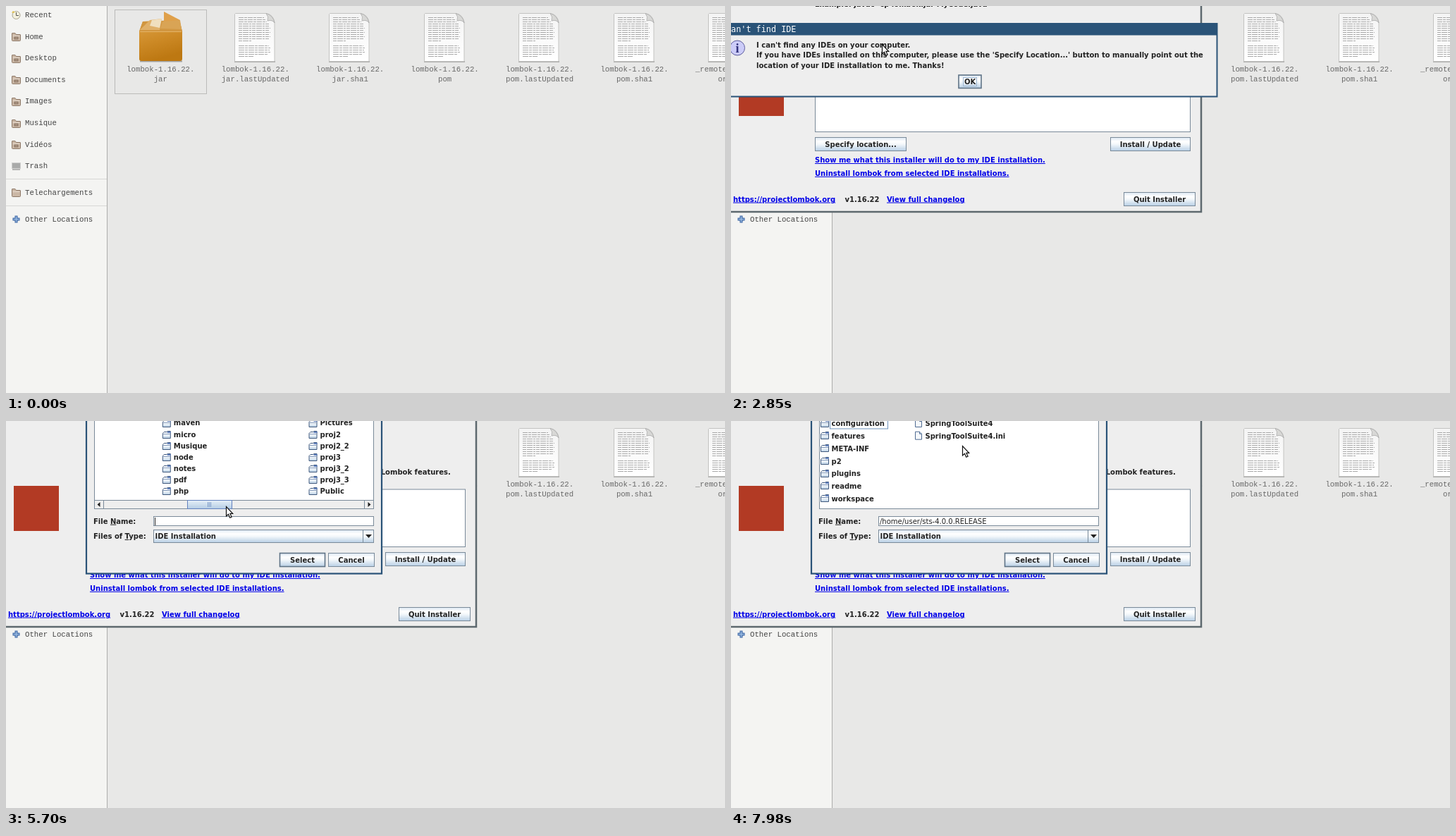
An HTML page that plays this animation: 1020 by 549 pixels, repeating every 8000 ms.

```html
<!DOCTYPE html>
<html lang="en">
<head>
<meta charset="utf-8">
<title>Installer walkthrough</title>
<style>
  html, body { margin: 0; width: 100%; height: 100%; overflow: hidden; background: #e8e8e7; }
  svg { display: block; width: 1020px; height: 549px; }
  text { font: bold 10px "DejaVu Sans", sans-serif; fill: #222; }
  .side, .file { font: 10.7px "Liberation Mono", monospace; fill: #444; }
  .file { fill: #686868; text-anchor: middle; }
  .mid { text-anchor: middle; }
  .link { fill: #0000e8; text-decoration: underline; }
  .title { font: 11.8px "DejaVu Sans Mono", monospace; fill: #fff; }
  .head { font-size: 14px; font-style: oblique; }
  .plain { font-weight: normal; }
  .key { text-decoration: underline; }
  .box { fill: #fff; stroke: #7a8a99; }
  .btn { fill: url(#ocean); stroke: #7a8a99; }
  .default { stroke: #5f7386; stroke-width: 1.6; }
  .focus { fill: none; stroke: #9bb6d2; }
  .active { stroke: #2a5378; }
  .inactive { stroke: #5d686e; }
</style>
</head>
<body>
<svg viewBox="0 0 1020 549">
  <defs>
    <linearGradient id="ocean" x2="0" y2="1">
      <stop stop-color="#dde8f3"/><stop offset=".3" stop-color="#fff"/>
      <stop offset=".5" stop-color="#f4f8fb"/><stop offset="1" stop-color="#b8cfe5"/>
    </linearGradient>
    <linearGradient id="thumbFill" x2="0" y2="1">
      <stop stop-color="#e6eff8"/><stop offset=".4" stop-color="#d3e2f0"/><stop offset="1" stop-color="#b4cce4"/>
    </linearGradient>
    <linearGradient id="carton" x2=".3" y2="1">
      <stop stop-color="#dda145"/><stop offset=".55" stop-color="#cd8a26"/><stop offset="1" stop-color="#bd7812"/>
    </linearGradient>
    <linearGradient id="paper" x2="0" y2="1">
      <stop stop-color="#f4f4f4"/><stop offset="1" stop-color="#fff"/>
    </linearGradient>
    <clipPath id="listClip"><rect x="126" width="395" height="112"/></clipPath>

    <symbol id="doc" overflow="visible">
      <path d="M0 69h58" stroke="#000" stroke-opacity=".25" stroke-width="2"/>
      <path d="M1.5.5H45Q55 2 57 13V68.500H.5V1.500Z" fill="url(#paper)" stroke="#c3c3c1"/>
      <path d="M45 .5Q49 5 47 11Q54 9 57 14Q55 3 45 .5Z" fill="#d8d8d6" stroke="#aaa" stroke-width=".8"/>
      <g stroke="#a9a9a9" stroke-width="1.100">
        <path d="M6 6.500h36M6 9.500h38M6 12.500h40" stroke-dasharray="7 1 4 1"/>
        <path d="M6 15.500h44M6 18.500h43M6 21.500h45M6 24.500h44M6 27.500h45M6 30.500h44M6 33.500h45M6 36.500h43M6 39.500h18" stroke-dasharray="5 1 8 1 3 1"/>
        <path d="M6 46.500h43M6 49.500h45M6 52.500h44M6 55.500h45M6 58.500h42M6 61.500h21" stroke-dasharray="8 1 4 1"/>
      </g>
    </symbol>
    <symbol id="place" overflow="visible">
      <path d="M.5 10.500V1Q.5.5 1 .5H5L6.500 2.500H12Q12.500 2.500 12.500 3V10.500Q12.500 11.500 11.500 11.500H1.500Q.5 11.500 .5 10.500Z" fill="#cbb8a6" stroke="#8d7867"/>
      <path d="M1.500 4.500H11.500" stroke="#e6d9cd"/>
    </symbol>
    <symbol id="folder" overflow="visible">
      <path d="M.5 10.500V3.500L2.500 1.500H6L7.500.5H11.500V10.500Z" fill="url(#ocean)" stroke="#3f587c"/>
      <path d="M7 2H12" stroke="#6382bf" stroke-width="2"/>
      <path d="M1 4.500H11" stroke="#7d95b8"/>
    </symbol>
    <symbol id="leaf" overflow="visible">
      <path d="M.5.5H6.500L9.500 3.500V11.500H.5Z" fill="#f6f9fc" stroke="#4f6b92"/>
      <path d="M6.500.5V3.500H9.500" fill="#b8cfe5" stroke="#4f6b92"/>
    </symbol>
  </defs>

  <g id="desktop"></g>
  <g id="installer"></g>
  <g id="notice"></g>
  <g id="chooser"></g>
  <path id="cursor" d="M0 0V13.500L3 10.800L5.200 15.800L7.600 14.700L5.400 9.900H9.200Z" fill="#fff" stroke="#111" stroke-width="1.200"/>
</svg>

<script>
const $ = id => document.getElementById(id);
const text = (x, y, str, cls = "") => `<text x="${x}" y="${y}" class="${cls}">${str}</text>`;
const rect = (x, y, w, h, cls, extra = "") =>
  `<rect x="${x}" y="${y}" width="${w}" height="${h}" class="${cls}" ${extra}/>`;
const use = (id, x, y) => `<use href="#${id}" x="${x}" y="${y}"/>`;
const button = (x, y, w, h, label, cls = "") =>
  rect(x, y, w, h, "btn " + cls) + text(x + w / 2, y + h / 2 + 3.7, label, "mid");

function desktop() {
  let out = rect(0, 0, 1020, 549, "", 'fill="#e8e8e7"') + rect(0, 0, 143, 549, "", 'fill="#f4f4f2"')
    + '<path d="M143.500 0V549" stroke="#adadab"/><path d="M0 245.500H143M0 283.500H143" stroke="#d7d7d5"/>';

  const places = ["Recent", "Home", "Desktop", "Documents", "Images", "Musique", "Vidéos", "Trash"];
  places.forEach((name, i) => {
    const y = 12.5 + i * 30.6;
    out += text(27, y + 3.5, name, "side");
    if (i > 0 && i < 7) out += use("place", 8, Math.round(y) - 5)
      + rect(12, Math.round(y) + 1, 5, 3, "", 'fill="#ad9885" stroke="#7d6858" stroke-width=".8"');
  });
  out += text(27, 268, "Telechargements", "side") + use("place", 8, 259) + text(27, 305.7, "Other Locations", "side");
  out += '<circle cx="14.500" cy="13" r="5.500" fill="#f3f0de" stroke="#aaa58e"/><path d="M14.500 9V13.500H18" fill="none" stroke="#555"/><path d="M8 10L10 7L13 9Z" fill="#e0bd42"/>';
  out += '<rect x="8.500" y="222.500" width="12" height="8" fill="#a9aaa9" stroke="#cfcfce"/><path d="M9 232H20" stroke="#777"/>';
  out += '<path d="M14.500 297.500V307.500M9.500 302.500H19.500" stroke="#3c67a5" stroke-width="4"/><path d="M14.500 298.500V306.500M10.500 302.500H18.500" stroke="#9dbde3" stroke-width="1.600"/>';

  const files = [["lombok-1.16.22.", "jar"], ["lombok-1.16.22.", "jar.lastUpdated"], ["lombok-1.16.22.", "jar.sha1"],
    ["lombok-1.16.22.", "pom"], ["lombok-1.16.22.", "pom.lastUpdated"], ["lombok-1.16.22.", "pom.sha1"], ["_remote.reposit", "ories"]];
  files.forEach(([top, bottom], i) => {
    const x = 219.3 + i * 134.45;
    out += text(x, 93, top, "file") + text(x, 107, bottom, "file");
    if (i) out += use("doc", Math.round(x - 30), 10);
  });
  out += rect(154.5, 5.5, 130, 119, "", 'fill="none" stroke="#8d8d8b" stroke-dasharray="1 1"');
  out += `<path d="M190 78.500H250" stroke="#000" stroke-opacity=".3" stroke-width="2"/>
    <path d="M189 36L194 22L246 20L250 36V75Q250 78 247 78H192Q189 78 189 75Z" fill="url(#carton)"/>
    <path d="M189 36L194 22L246 20L250 36Z" fill="#d19640"/>
    <path d="M190 34L204 20L221 18L218 34Z" fill="#e0b069"/>
    <path d="M204 28L207 20L221 18L218 31Z" fill="#f0dfbf"/>
    <path d="M224 8L247 20L224 24Z" fill="#dfa04a"/>
    <path d="M222 22L247 20L249 33L219 32Z" fill="#d9a455"/>
    <path d="M190 36.500H249" stroke="#e4b366"/>`;
  return out;
}

function installer() {
  return rect(-4, -4, 671, 296, "active", 'id="frame" fill="#eee" stroke-width="2.500"')
    + rect(11, 92, 64, 64, "", 'fill="#b23a24"')
    + text(119, 1, "Example: javac -cp lombok.jar MyCode.java")
    + text(119, 55.5, "IDEs", "head")
    + text(119, 75.7, "Lombok can update your Eclipse or eclipse-based IDE to fully support all Lombok features.")
    + text(119, 87.7, "Select IDE installations below and hit 'Install/Update'.")
    + rect(119.5, 97, 532, 81.5, "box")
    + button(119.5, 186.5, 129, 19, "Specify location...")
    + '<g id="hover">' + rect(120.5, 187.5, 127, 17, "focus", 'style="stroke:#7f9fc4;stroke-width:2"')
    + rect(132.5, 189.5, 103, 13, "focus") + "</g>"
    + button(538.5, 186.5, 113, 19, "Install / Update")
    + text(119, 222, "Show me what this installer will do to my IDE installation.", "link")
    + text(119, 240.8, "Uninstall lombok from selected IDE installations.", "link")
    + text(3, 277.6, "https://projectlombok.org", "link")
    + text(161.5, 277.6, "v1.16.22")
    + text(221, 277.6, "View full changelog", "link")
    + button(557.5, 264.5, 101, 19, "Quit Installer");
}

function notice() {
  return rect(-4, 25, 693.5, 103.5, "active", 'fill="#eee" stroke-width="2"')
    + rect(0, 24, 690, 17.5, "", 'fill="#2a5378"')
    + text(-7, 36.5, "Can't find IDE", "title")
    + '<circle cx="9" cy="59.500" r="10.500" fill="#ccccf8" stroke="#5c5c9c"/>'
    + '<text x="9" y="66" class="mid" style="font:bold 18px Liberation Serif,serif;fill:#33337c">i</text>'
    + text(36, 58.7, "I can't find any IDEs on your computer.")
    + text(36, 73.3, "If you have IDEs installed on this computer, please use the 'Specify Location...' button to manually point out the")
    + text(36, 87.8, "location of your IDE installation to me. Thanks!")
    + button(323, 98, 32, 18.5, "OK", "default") + rect(329.5, 101.5, 19, 12, "focus");
}

const columns = [
  "angular apps backup bin books boot build",
  "ubuntu code-samples-for-Derek-Low cours python node-up demo deploys-script",
  "dev2 doc dockers Documents Downloads e2e el",
  "gs-rest gs-web hibernate Images initializr jquery less",
  "maven micro Musique node notes pdf php",
  "Pictures proj2 proj2_2 proj3 proj3_2 proj3_3 Public",
  "quizzes qute rev ruin sandbox soap spring",
  "spring2 sql sts-4.0.0.RELEASE Templates test tmp tomcat",
  "tools ui Videos vue web work xml"
];
const colWidth = 207.7;

function homeList() {
  let out = rect(7 * colWidth + 15, 28, 122, 15, "", 'id="picked" fill="#b8cfe5"');
  columns.forEach((names, c) => names.split(" ").forEach((name, r) => {
    const x = c * colWidth, y = 2.7 + r * 16.1;
    out += use("folder", x, Math.round(y) - 5) + text(x + 16, y + 3.7, name);
  }));
  return out;
}

function ideList() {
  let out = "";
  "configuration features META-INF p2 plugins readme workspace".split(" ").forEach((name, r) => {
    const y = 3.7 + r * 17.7;
    out += use("folder", 127, Math.round(y) - 6) + text(142.5, y + 3.7, name);
  });
  ["SpringToolSuite4", "SpringToolSuite4.ini"].forEach((name, r) => {
    out += use("leaf", 261, r * 17.7 - 3) + text(275.5, 7.4 + r * 17.7, name);
  });
  return out + rect(140.5, -5, 82, 16, "", 'fill="none" stroke="#6f94bd"');
}

function chooser() {
  return rect(114, -4, 419, 220.5, "active", 'fill="#eee" stroke-width="2.200"')
    + rect(125.5, -4, 396, 128.5, "box")
    + `<g id="home"><g clip-path="url(#listClip)"><g id="scroll">${homeList()}</g></g>`
    + rect(125.5, 112.5, 396, 12, "", 'fill="#eee" stroke="#7a8a99"')
    + '<path d="M138.500 113V124M508.500 113V124" stroke="#7a8a99"/>'
    + '<path d="M133.500 115V122L129.500 118.500ZM513.500 115V122L517.500 118.500Z" fill="#222"/>'
    + '<g id="thumb">' + rect(.5, 112.5, 63, 12, "", 'fill="url(#thumbFill)" stroke="#6382bf"')
    + '<path d="M29.500 115V122M31.500 115V122M33.500 115V122" stroke="#7e9cc9"/></g></g>'
    + `<g id="ide">${ideList()}</g>`
    + text(124, 145.7, 'File <tspan class="key">N</tspan>ame:')
    + rect(209.5, 135.5, 312, 13, "box")
    + text(211, 145.7, "/home/user/sts-4.0.0.RELEASE", "plain").replace("<text", '<text id="path"')
    + '<path id="caret" d="M211.500 137V148" stroke="#222"/>'
    + text(124, 167, 'Files of <tspan class="key">T</tspan>ype:')
    + rect(209.5, 154.5, 312, 18, "btn")
    + text(211.5, 166.8, "IDE Installation")
    + '<path d="M506.500 155V172" stroke="#7a8a99"/><path d="M510 161H519L514.500 166Z" fill="#222"/>'
    + button(388.5, 187.5, 64, 19, "Select", "default")
    + button(457.5, 187.5, 65, 19, "Cancel");
}

Object.entries({ desktop, installer, notice, chooser }).forEach(([id, draw]) => { $(id).innerHTML = draw(); });

const loop = 8000, tick = 190;

// Pointer keys: [tick, x, y], linear in between
const pointer = [
  [1, 326, 20], [2, 312, 8], [4, 240, 34], [5, 218, 52], [6, 216, 58], [8, 262, 140], [9, 280, 160],
  [10, 287, 158], [11, 211, 52], [12, 214, 54], [15, 214, 54], [18, 330, 104], [19, 336, 107], [20, 336, 108],
  [22, 250, 188], [23, 236, 197], [24, 236, 197], [26, 194, 112], [27, 233, 110], [30, 312, 121],
  [33, 356, 125], [35, 401, 124], [36, 401, 122], [38, 340, 45], [39, 328, 35], [42, 328, 35]
];

function pointerAt(n) {
  const i = Math.max(1, pointer.findIndex(k => k[0] >= n));
  const [n0, x0, y0] = pointer[i - 1], [n1, x1, y1] = pointer[i];
  const f = (n - n0) / (n1 - n0);
  return [Math.round(x0 + f * (x1 - x0)), Math.round(y0 + f * (y1 - y0))];
}

const show = (id, on) => { $(id).style.display = on ? "" : "none"; };

function render(now) {
  const t = now % loop, n = Math.floor(t / tick);
  const [x, y] = pointerAt(Math.max(1, n));
  show("cursor", n >= 1);
  $("cursor").setAttribute("transform", `translate(${x + .5} ${y + .5})`);

  const noticeOn = n >= 14 && n < 20, chooserOn = n >= 24;
  show("installer", n >= 13);
  show("notice", noticeOn);
  show("chooser", chooserOn);
  show("hover", n >= 22);
  $("frame").setAttribute("class", noticeOn || chooserOn ? "inactive" : "active");

  const thumb = n < 26 ? 138 : n > 35 ? 346 : Math.max(138, x - 55);
  const scroll = thumb < 178 ? (thumb - 138) * 6.5 : 260 + (thumb - 178) * 6;
  $("thumb").setAttribute("transform", `translate(${thumb})`);
  $("scroll").setAttribute("transform", `translate(${Math.round(125 - scroll)})`);

  show("picked", n >= 39);
  show("home", n < 40);
  show("ide", n >= 40);
  show("path", n >= 39);
  show("caret", n < 38 && Math.floor((n * tick - 4650) / 500) % 2 === 0);
}

const start = performance.now();
(function frame() {
  render(performance.now() - start);
  requestAnimationFrame(frame);
})();
</script>
</body>
</html>
```
